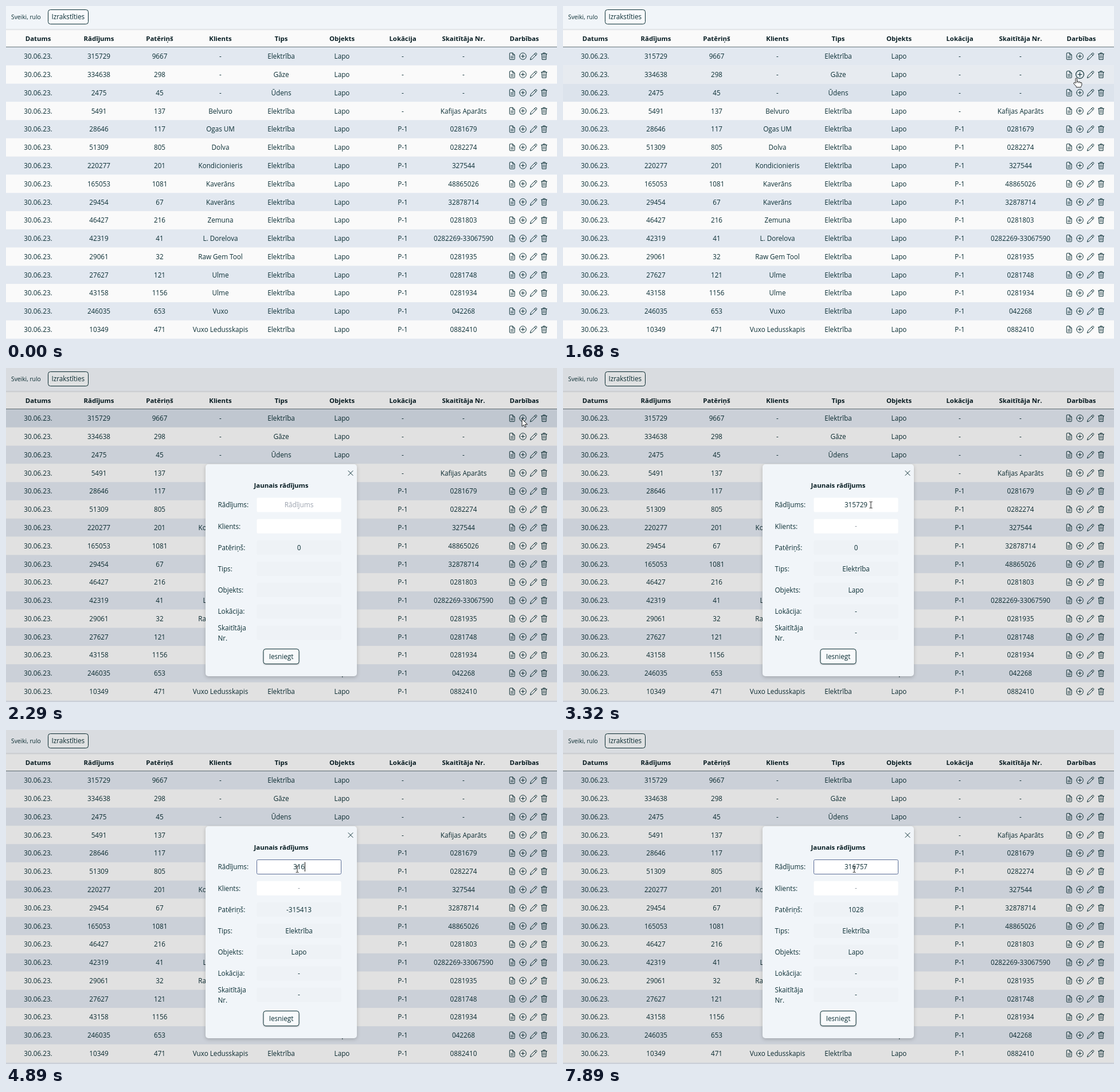
These frames come from a looping animation (961 by 583 pixels, 8 s). An HTML page:

```html
<!DOCTYPE html>
<html lang="lv">
<head>
<meta charset="utf-8">
<title>Rādījumi</title>
<style>
html, body { margin: 0; width: 100%; height: 100%; overflow: hidden; background: #fafafa; }
svg { display: block; }
text { font: 11.7px "Open Sans", "Noto Sans", sans-serif; fill: #0b2f35; white-space: pre; }
.mid { text-anchor: middle; }
.bold { font-weight: 700; font-size: 11.4px; fill: #061c22; }
.small { font-size: 10.3px; }
.icon { fill: none; stroke: #0b2f35; stroke-linecap: round; stroke-linejoin: round; }
.button { fill: #f8fafc; stroke: #0b2f35; }
</style>
</head>
<body>
<svg id="stage" width="961" height="583" viewBox="0 0 961 583"></svg>
<script>
const LOOP = 8000, PITCH = 31.79, TOP = 72, BASE_READING = 315729;
const OPEN = 2290, FILL = 2500, FOCUS = 3460, DRAG = 3700, TYPE = 4890;
const DIGIT = 6.7, FIELD_X = 511;
const stage = document.getElementById("stage");

function add(parent, tag, attrs = {}, content = "") {
  const el = document.createElementNS("http://www.w3.org/2000/svg", tag);
  for (const key in attrs) el.setAttribute(key, attrs[key]);
  el.textContent = content;
  return parent.appendChild(el);
}
const label = (parent, x, y, content, cls = "mid") => add(parent, "text", { x, y, class: cls }, content);
const box = (parent, x, y, width, height, fill, more) =>
  add(parent, "rect", { x, y, width, height, fill, ...more });
const show = (el, on) => { el.style.display = on ? "" : "none"; };
const move = (el, x, y, scale = 1) => el.setAttribute("transform", `translate(${x} ${y}) scale(${scale})`);

// Table
const columns = ["Datums", "Rādījums", "Patēriņš", "Klients", "Tips", "Objekts", "Lokācija", "Skaitītāja Nr.", "Darbības"];
const columnX = i => 56 + 106 * i;
const data = [
  "315729|9667|-|Elektrība|-|-",
  "334638|298|-|Gāze|-|-",
  "2475|45|-|Ūdens|-|-",
  "5491|137|Belvuro|Elektrība|-|Kafijas Aparāts",
  "28646|117|Ogas UM|Elektrība|P-1|0281679",
  "51309|805|Dolva|Elektrība|P-1|0282274",
  "220277|201|Kondicionieris|Elektrība|P-1|327544",
  "165053|1081|Kaverāns|Elektrība|P-1|48865026",
  "29454|67|Kaverāns|Elektrība|P-1|32878714",
  "46427|216|Zemuna|Elektrība|P-1|0281803",
  "42319|41|L. Dorelova|Elektrība|P-1|0282269-33067590",
  "29061|32|Raw Gem Tool|Elektrība|P-1|0281935",
  "27627|121|Ulme|Elektrība|P-1|0281748",
  "43158|1156|Ulme|Elektrība|P-1|0281934",
  "246035|653|Vuxo|Elektrība|P-1|042268",
  "10349|471|Vuxo Ledusskapis|Elektrība|P-1|0882410"
];
const iconPaths = [
  "M-4.4-5Q-4.4-5.8-3.6-5.8H1L4.4-2.4V5Q4.4 5.8 3.6 5.8H-3.6Q-4.4 5.8-4.4 5ZM1-5.5V-2.4H4M-2.2 .3H2.2M-2.2 2.8H2.2",
  "M-5.8 0A5.8 5.8 0 1 1 5.8 0A5.8 5.8 0 1 1-5.8 0M-2.8 0H2.8M0-2.8V2.8",
  "M-5.6 5.8L-4.5 2.2 3-5.2Q4.2-6.2 5.3-5.2T5.3-2.8L-2 4.7ZM1.8-4L4.1-1.7",
  "M-5-4H5M-1.8-4V-5.8H1.8V-4M-4-4L-3.5 5.8H3.5L4-4M-1.4-1.6V3.4M1.4-1.6V3.4"
];
const iconX = [882.7, 901.5, 920, 938.5];
const rowY = i => TOP + PITCH * i;
const bands = [...Array(17).keys()].map(i => box(stage, 0, rowY(i), 961, PITCH));
const rowTexts = data.map((line, i) => {
  const group = add(stage, "g");
  const cells = line.split("|");
  cells.splice(4, 0, "Lapo");
  ["30.06.23.", ...cells].forEach((cell, c) => label(group, columnX(c), 20.2, cell));
  move(group, 0, rowY(i));
  return group;
});
const icons = data.map((_, i) => iconPaths.map((d, k) => {
  const icon = add(stage, "path", { d, class: "icon" });
  move(icon, iconX[k], rowY(i) + 15.7);
  return icon;
}));

box(stage, 0, 41, 961, 30, "#fafafa");
box(stage, 0, 71, 961, 1, "#66757d");
columns.forEach((name, c) => label(stage, columnX(c), 60.5, name, "mid bold"));
box(stage, 0, 0, 961, 40, "#f1f5f9");
box(stage, 0, 40, 961, 1, "#dde1e5");
box(stage, 0, 41, 961, 1, "#e9ebed");
box(stage, 0, 42, 961, 1, "#f3f4f5");
label(stage, 9, 22.5, "Sveiki, rulo", "small");
box(stage, 73.5, 6.5, 70, 25, "", { rx: 4, class: "button" });
label(stage, 108.3, 23.2, "Izrakstīties");

// Dialog
const dialog = add(stage, "g");
box(dialog, 0, 0, 961, 583, "#000", { opacity: .1 });
box(dialog, 348, 168, 264, 370, "#f1f5f9", { rx: 5, style: "filter:drop-shadow(0 2px 3px #0003)" });
add(dialog, "path", { d: "M597 179.5l8 8m0-8l-8 8", class: "icon" });
label(dialog, 480, 209.3, "Jaunais rādījums", "mid bold");
const fieldY = i => 239 + 37.2 * i;
["Rādījums:", "Klients:", "Patēriņš:", "Tips:", "Objekts:", "Lokācija:"]
  .forEach((name, i) => label(dialog, 369.5, fieldY(i) + 4.4, name, ""));
label(dialog, 369.5, 457.8, "Skaitītāja", "");
label(dialog, 369.5, 476.3, "Nr.", "");
const fields = [...Array(7).keys()].map(i =>
  box(dialog, 437.5, fieldY(i) - 12.5, 147, 25, i < 2 ? "#fff" : "#eef2f6", { rx: 2 }));
const selection = box(dialog, 0, 231, 0, 16, "#0078d7");
const values = fields.map((_, i) => label(dialog, FIELD_X, fieldY(i) + 4.2, ""));
const plain = add(values[0], "tspan"), marked = add(values[0], "tspan", { fill: "#fff" });
const caret = box(dialog, 0, 230.5, 1, 16.5, "#111");
box(dialog, 449, 490.5, 62, 26, "", { rx: 4, class: "button", style: "filter:drop-shadow(0 1px 1px #0004)" });
label(dialog, 480, 508, "Iesniegt");

// Pointers
const pointers = {
  arrow: add(stage, "path", {
    d: "M0 0V13L3 10.2 4.9 14.4 7 13.5 5.1 9.4H9.3Z", fill: "#fff", stroke: "#222"
  }),
  hand: add(stage, "path", {
    d: "M-1.3 8.5V.8Q-1.3-.6 0-.6T1.3.8V5.5Q4 4.8 4.3 6.2Q6.8 5.5 7 7Q9.6 6.6 9.6 8.6V11.5Q9.4 13 8 14.5V15.5H0V14L-4.6 9Q-4.6 7-2.6 7.4Z" +
      "M1.3 5.5V8M4.3 6.2V8.2M7 7V8.6",
    fill: "#fff", stroke: "#222"
  }),
  beam: add(stage, "path", {
    d: "M-2.5-5.5H-1L0-4.8 1-5.5H2.5M0-4.8V4.8M-2.5 5.5H-1L0 4.8 1 5.5H2.5", fill: "none", stroke: "#222"
  })
};

const path = [
  [1060, 872, 575], [1400, 885, 210], [1600, 893, 140], [1820, 899, 103], [1950, 900, 89],
  [2320, 900, 89], [2600, 690, 200], [2900, 532, 268], [3320, 537, 239],
  [DRAG, 537, 240], [4100, 504, 243], [4230, 512, 242], [4300, 508, 243]
];
function pointerAt(t) {
  if (t < path[0][0]) return null;
  const next = path.findIndex(p => p[0] > t);
  if (next < 0) return path[path.length - 1].slice(1);
  const a = path[next - 1], b = path[next], k = (t - a[0]) / (b[0] - a[0]);
  return [a[1] + (b[1] - a[1]) * k, a[2] + (b[2] - a[2]) * k];
}

// Row highlight fades in and out over 150 ms
function hoverLevels(t) {
  const levels = bands.map(() => 0), step = 10;
  for (let s = t - 400; s <= t; s += step) {
    const p = s < 2230 && pointerAt(s);
    const hovered = p ? Math.floor((p[1] - TOP) / PITCH) : -1;
    levels.forEach((v, i) => {
      levels[i] = Math.min(1, Math.max(0, v + (i === hovered ? step : -step) / 150));
    });
  }
  return levels;
}
const mix = (a, b, k) => `rgb(${a.map((v, i) => Math.round(v + (b[i] - v) * k))})`;

const typed = [
  [FILL, "315729"], [TYPE, "316"], [5230, "3167"], [5500, "31675"],
  [5700, "316758"], [7090, "31675"], [7290, "316757"]
];

function drawTable(t, p) {
  hoverLevels(t).forEach((level, i) => {
    bands[i].setAttribute("fill", mix(i % 2 ? [250, 250, 250] : [226, 232, 240], [203, 213, 225], level));
  });
  let overIcon = false;
  icons.forEach((row, i) => row.forEach((icon, k) => {
    const y = rowY(i) + 15.7;
    const over = p && t < OPEN && Math.abs(p[0] - iconX[k]) < 7 && Math.abs(p[1] - y) < 7;
    overIcon = overIcon || over;
    move(icon, iconX[k], y, over ? 1.2 : 1);
  }));
  const swapped = t >= FILL;
  move(rowTexts[7], 0, rowY(swapped ? 8 : 7));
  move(rowTexts[8], 0, rowY(swapped ? 7 : 8));
  return overIcon;
}

function drawDialog(t, p) {
  show(dialog, t >= OPEN);
  if (t < OPEN) return;
  const filled = t >= FILL, focused = t >= FOCUS;
  const reading = filled ? typed.filter(e => e[0] <= t).pop()[1] : "";
  const half = reading.length * DIGIT / 2;
  const selecting = t >= DRAG && t < TYPE;
  const drag = Math.round((p[0] - FIELD_X + half) / DIGIT);
  const start = !selecting ? reading.length : t >= 4100 ? 2 : Math.min(6, Math.max(2, drag));

  plain.textContent = filled ? reading.slice(0, start) : "Rādījums";
  plain.style.fill = filled ? "" : "#9ca3af";
  marked.textContent = reading.slice(start);
  selection.setAttribute("x", FIELD_X - half + start * DIGIT);
  selection.setAttribute("width", (reading.length - start) * DIGIT);

  const rest = filled ? ["-", reading - BASE_READING, "Elektrība", "Lapo", "-", "-"] : ["", 0, "", "", "", ""];
  rest.forEach((value, i) => { values[i + 1].textContent = value; });
  values[1].style.fill = "#8b949e";

  fields[0].setAttribute("stroke", focused ? "#5b6d96" : "none");
  caret.setAttribute("x", FIELD_X + half - .2);
  show(caret, focused && !selecting && !(t >= 6230 && t < 6760) && t < 7890);
}

function draw(t) {
  const p = pointerAt(t);
  const overIcon = drawTable(t, p);
  drawDialog(t, p);
  const inField = p && t >= OPEN && p[0] > 437 && p[0] < 585 && p[1] > 226 && p[1] < 289;
  const kind = inField ? "beam" : overIcon && t < 2150 ? "hand" : "arrow";
  for (const name in pointers) {
    show(pointers[name], p && name === kind);
    if (p) move(pointers[name], p[0], p[1]);
  }
}

const begin = performance.now();
function tick() {
  draw((performance.now() - begin) % LOOP);
  requestAnimationFrame(tick);
}
tick();
</script>
</body>
</html>
```
